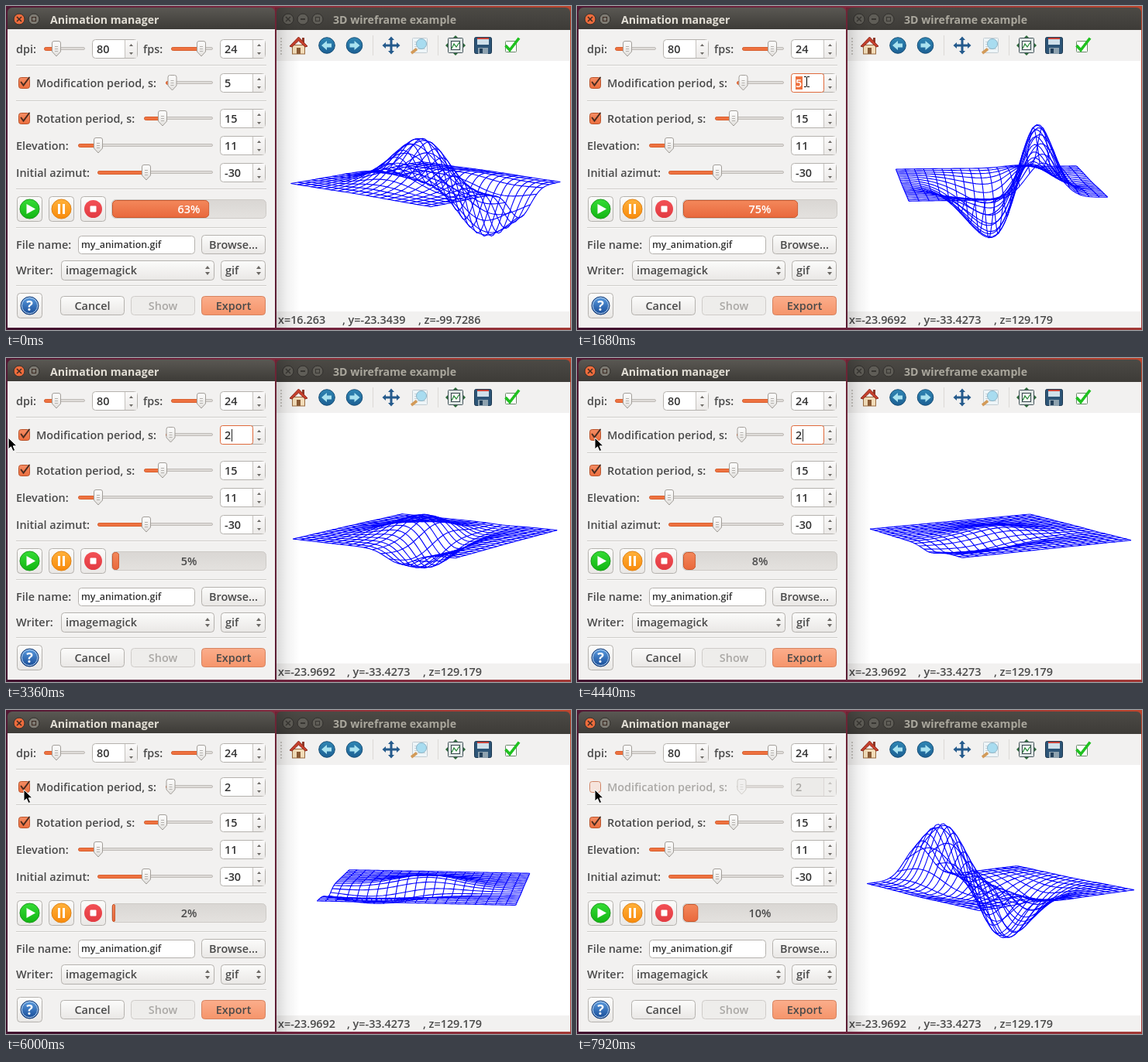
An HTML page with a canvas that plays this animation: 729x419 px, repeating every 8 s.

```html
<!DOCTYPE html>
<html lang="en">
<head>
<meta charset="utf-8">
<title>Animation manager</title>
<style>
html, body { margin: 0; width: 100%; height: 100%; overflow: hidden; background: #3d1430; }
canvas { display: block; }
</style>
</head>
<body>
<canvas id="stage" width="729" height="419"></canvas>
<script>
const c = document.getElementById('stage').getContext('2d');
const LOOP = 8000, STEP = 120, RAD = Math.PI / 180;
const FACE = '"Open Sans", "Noto Sans", sans-serif';
const INK = '#4a4a4a', PALE = '#aaa8a5', BG = '#f2f1f0', ORANGE = '#ee7240';

// ---------- helpers ----------
function gradient(x0, y0, x1, y1, ...stops) {
  const g = c.createLinearGradient(x0, y0, x1, y1);
  stops.forEach((s, i) => g.addColorStop(i / (stops.length - 1), s));
  return g;
}

const vgrad = (y, h, ...stops) => gradient(0, y, 0, y + h, ...stops);

function rect(x, y, w, h, fill) {
  c.fillStyle = fill;
  c.fillRect(x, y, w, h);
}

function box(x, y, w, h, r, fill, stroke) {
  c.beginPath();
  c.roundRect(x + .5, y + .5, w - 1, h - 1, r);
  if (fill) { c.fillStyle = fill; c.fill(); }
  if (stroke) { c.strokeStyle = stroke; c.lineWidth = 1; c.stroke(); }
}

function disc(x, y, r, fill, stroke) {
  c.beginPath();
  c.arc(x, y, r, 0, 7);
  c.fillStyle = fill;
  c.fill();
  if (stroke) { c.strokeStyle = stroke; c.lineWidth = 1; c.stroke(); }
}

function poly(pts, fill, stroke, width = 1, open) {
  c.beginPath();
  for (let i = 0; i < pts.length; i += 2) c.lineTo(pts[i], pts[i + 1]);
  if (!open) c.closePath();
  if (fill) { c.fillStyle = fill; c.fill(); }
  if (stroke) { c.strokeStyle = stroke; c.lineWidth = width; c.stroke(); }
}

function text(s, x, y, color = INK, align = 'left', size = 14.4, weight = 600) {
  c.font = `${weight} ${size}px ${FACE}`;
  c.textAlign = align;
  c.fillStyle = color;
  c.fillText(s, x, y);
}

// ---------- widgets ----------
function separator(y) {
  rect(13, y, 323, 1, '#cfcdca');
  rect(13, y + 1, 323, 1, '#fbfafa');
}

function button(x, y, w, h, label, color = INK, fill, stroke = '#b5b2ae') {
  box(x, y, w, h, 4, fill || vgrad(y, h, '#fcfcfb', '#e9e7e5'), stroke);
  if (label) text(label, x + w / 2, y + h / 2 + 5.5, color, 'center');
}

function slider(x0, x1, y, pos, off) {
  box(x0, y - 2, x1 - x0, 4, 2, '#dedbd8', off ? '#d3d0cd' : '#c0bcb8');
  if (!off) box(x0, y - 2, pos - x0, 5, 2, ORANGE, '#d9602f');
  const body = off ? '#f0efee' : vgrad(y - 10, 20, '#ffffff', '#e2e0dd');
  c.beginPath();
  c.moveTo(pos - 5.5, y - 7);
  c.quadraticCurveTo(pos - 5.5, y - 9.5, pos - 3, y - 9.5);
  c.lineTo(pos + 3, y - 9.5);
  c.quadraticCurveTo(pos + 5.5, y - 9.5, pos + 5.5, y - 7);
  c.lineTo(pos + 5.5, y + 4);
  c.lineTo(pos, y + 10);
  c.lineTo(pos - 5.5, y + 4);
  c.closePath();
  c.fillStyle = body;
  c.fill();
  c.strokeStyle = off ? '#cfccc8' : '#a29e99';
  c.lineWidth = 1;
  c.stroke();
  for (let i = -3; i < 4; i += 3) rect(pos - 2, y + i, 4, 1, off ? '#d8d6d3' : '#b4b1ad');
}

function spin(x, y, value, { off, focus, selected, caret } = {}) {
  const w = 59, split = x + 43;
  box(x, y, w, 25, 4, off ? '#ecebe9' : '#ffffff', off ? '#d0cdca' : '#b5b2ae');
  rect(split, y + 1, 15, 23, off ? '#eeedeb' : vgrad(y, 25, '#fbfafa', '#ebe9e7'));
  rect(split - 1, y + 1, 1, 23, off ? '#dad7d4' : '#c6c3bf');
  const mark = off ? '#c4c1be' : '#6b6864', ax = x + 50.5;
  poly([ax - 2.5, y + 9, ax, y + 6, ax + 2.5, y + 9], mark);
  poly([ax - 2.5, y + 17, ax, y + 20, ax + 2.5, y + 17], mark);
  if (focus) box(x, y, 43, 25, 3, '#ffffff', '#e06a3c');
  if (selected) rect(x + 6, y + 4, 9, 17, ORANGE);
  text(value, x + 6, y + 18, selected ? '#fff' : off ? PALE : '#333');
  if (caret) rect(x + 15, y + 5, 1, 16, '#222');
}

function checkbox(y, on) {
  box(16, y - 7, 15, 15, 3, on ? vgrad(y - 7, 15, '#f58e65', '#ec6d3d') : '#f6e4dc', on ? '#b9532b' : '#d08465');
  if (on) {
    c.lineCap = 'round';
    poly([19.5, y - .5, 22.5, y + 3.5, 30, y - 6.5], null, '#4a2c20', 2, true);
    c.lineCap = 'butt';
  }
}

function combo(x, w, label) {
  button(x, 329, w, 26);
  text(label, x + 6, 347);
  const ax = x + w - 9;
  poly([ax - 3, 340, ax, 336, ax + 3, 340], '#6b6864');
  poly([ax - 3, 344, ax, 348, ax + 3, 344], '#6b6864');
}

function progress(p) {
  const x = 136, y = 250, w = 200, h = 25, fill = Math.max(4, p * 198);
  const label = color => text(Math.round(p * 100) + '%', 236, 268, color, 'center');
  box(x, y, w, h, 5, vgrad(y, h, '#d9d6d3', '#e4e2df'), '#cdcac6');
  label(INK);
  c.save();
  c.beginPath();
  c.rect(x, y, fill + 1, h);
  c.clip();
  box(x + 1, y + 1, fill, h - 2, Math.min(5, fill / 2), vgrad(y, h, '#f48a5d', '#e8663a'), '#c9572c');
  label('#fff');
  c.restore();
}

// ---------- windows ----------
function titleBar(x, w, label, tx, active) {
  c.beginPath();
  c.roundRect(x, 2, w, 40, [6, 6, 0, 0]);
  c.fillStyle = active ? vgrad(2, 28, '#5a5853', '#3d3b37') : vgrad(2, 28, '#4c4a45', '#3e3c38');
  c.fill();
  const edge = '#302e2b', glyph = active ? '#3c2a22' : '#383632';
  const cx = x + 15, bg = active ? '#7d7a72' : '#5f5d57';
  const square = sx => {
    c.strokeStyle = glyph;
    c.strokeRect(sx - 2.5, 14.5, 5, 5);
  };
  disc(cx, 17, 7, active ? '#ee6c3c' : bg, edge);
  poly([cx - 3, 14, cx + 3, 20], null, glyph, 1.5, true);
  poly([cx + 3, 14, cx - 3, 20], null, glyph, 1.5, true);
  disc(cx + 19, 17, 7, bg, edge);
  if (active) {
    square(cx + 19);
  } else {
    rect(cx + 16, 16, 6, 2, glyph);
    disc(cx + 38, 17, 7, bg, edge);
    square(cx + 38);
  }
  text(label, tx, 23, active ? '#e3dfd6' : '#aaa79d', 'left', 14.1, 700);
}

function desktop() {
  rect(0, 0, 729, 419, gradient(0, 300, 729, 0, '#42122f', '#7b2740', '#bd452d'));
}

function leftWindow(s) {
  titleBar(2, 345, 'Animation manager', 57, true);
  rect(2, 30, 345, 386, BG);

  text('dpi:', 13, 61);
  slider(49, 102, 55, 65);
  spin(111, 43, '80');
  text('fps:', 177, 61);
  slider(213, 267, 55, 252);
  spin(276, 43, '24');
  [76, 122, 236, 286, 361].forEach(separator);

  checkbox(99, s.on);
  text('Modification period, s:', 39, 105, s.on ? INK : PALE);
  slider(206, 267, 99, s.period === 5 ? 214.5 : 212.5, !s.on);
  spin(276, 87, s.period, { off: !s.on, focus: s.focus, selected: s.selected, caret: s.focus && !s.selected });

  checkbox(145, true);
  text('Rotation period, s:', 39, 151);
  slider(178, 267, 145, 202);
  spin(276, 133, '15');
  text('Elevation:', 13, 186);
  slider(93, 267, 180, 119);
  spin(276, 168, '11');
  text('Initial azimut:', 13, 221);
  slider(118, 267, 215, 181);
  spin(276, 203, '-30');

  [14, 55, 96].forEach(x => button(x, 246, 33, 33));
  disc(30.5, 262.5, 12.5, vgrad(250, 25, '#35dc35', '#12b512'), '#1a9a1a');
  poly([26.5, 256, 38, 262.5, 26.5, 269], '#fff');
  disc(71.5, 262.5, 12.5, vgrad(250, 25, '#ffb13a', '#f88a0c'), '#e08212');
  rect(67, 256, 3, 13, '#fff');
  rect(73, 256, 3, 13, '#fff');
  disc(112.5, 262.5, 11.5, vgrad(251, 23, '#f25055', '#e23b42'));
  box(108, 258, 9, 9, 1, '#fff');
  progress(s.progress);

  text('File name:', 13, 314);
  box(93, 297, 151, 24, 4, '#fff', '#b5b2ae');
  text('my_animation.gif', 97, 313, '#333', 'left', 12.4);
  button(252, 296, 83, 25, 'Browse...');
  text('Writer:', 13, 347);
  combo(71, 198, 'imagemagick');
  combo(277, 58, 'gif');

  button(14, 371, 33, 33);
  disc(30.5, 387.5, 11.5, vgrad(376, 23, '#5c9de0', '#164a96'), '#153a74');
  c.beginPath();
  c.arc(30.5, 387.5, 10.2, 0, 7);
  c.strokeStyle = '#b9d3ee';
  c.stroke();
  text('?', 30.5, 394, '#fff', 'center', 18, 700);
  button(70, 375, 83, 25, 'Cancel');
  button(161, 375, 83, 25, 'Show', PALE, '#eeedeb', '#cfccc9');
  button(252, 375, 83, 25, 'Export', INK, vgrad(375, 25, '#fbae8c', '#f5946a'), '#d68360');
}

function arrowDisc(x, dir) {
  disc(x, 51, 10.3, vgrad(41, 21, '#2f86b4', '#1c5f93'), '#174f78');
  const p = (dx, dy) => [x + dir * dx, 51 + dy];
  poly([...p(-7, 0), ...p(0, -6), ...p(0, -2.5), ...p(6, -2.5), ...p(6, 2.5), ...p(0, 2.5), ...p(0, 6)], '#a9e2f0');
}

function toolbar() {
  for (let y = 41; y < 62; y += 4) rect(354, y, 2, 2, '#c6c3bf');
  rect(473, 38, 1, 26, '#dcd9d6');
  rect(557, 38, 1, 26, '#dcd9d6');

  rect(369, 50, 17, 12, '#f1dcb8');
  c.strokeStyle = '#9a6a40';
  c.strokeRect(369.5, 50.5, 16, 11.5);
  rect(382, 41, 3, 7, '#8d3a2a');
  poly([366, 52, 377.5, 40, 389, 52, 386, 53, 377.5, 45, 369, 53], '#c8402c', '#8e2a1e');
  rect(375, 54, 5, 8, '#8a5a34');

  arrowDisc(414, 1);
  arrowDisc(449.5, -1);

  for (let k = 0; k < 4; k++) {
    c.save();
    c.translate(497, 51);
    c.rotate(k * Math.PI / 2);
    poly([-1.5, 0, -1.5, -7, -4, -7, 0, -11.5, 4, -7, 1.5, -7, 1.5, 0], '#245a8c');
    c.restore();
  }

  box(524, 41, 20, 20, 1, '#eef5f8', '#c3ccd2');
  for (let y = 46; y < 58; y += 3) rect(527, y, 14, 1, '#c9d2d8');
  poly([523, 61, 530, 55.5], null, '#d39a58', 3.5, true);
  disc(536, 49, 6.5, '#a8dcf0', '#8db4c6');

  box(570, 41, 20, 20, 1, '#dfe6e4', '#44545a');
  rect(574, 45, 12, 12, '#fff');
  c.strokeStyle = '#33444a';
  c.strokeRect(574.5, 45.5, 11, 11);
  poly([575, 55, 578, 49, 581, 53, 585, 47], null, '#2b8b3c', 1.3, true);
  [[580, 39], [592, 51], [580, 63], [568, 51]].forEach(([x, y], k) => {
    c.save();
    c.translate(x, y);
    c.rotate(k * Math.PI / 2);
    poly([-3, 2, 0, -1, 3, 2], '#2d6a3a');
    c.restore();
  });

  box(604, 40, 23, 22, 2, '#2d5577', '#1b364e');
  rect(608, 41, 15, 9, '#cfe0ea');
  rect(608, 41, 15, 2, '#c9443a');
  rect(609, 54, 13, 8, '#8fa3b0');
  rect(611, 55, 4, 6, '#23405a');

  box(644, 45, 15, 15, 1, '#fff', '#6a8a6a');
  poly([644.5, 51, 650, 57, 662, 41.5], null, '#1fc11f', 3.6, true);
}

// ---------- surface ----------
const steps = (n, by) => [...Array(n).keys()].map(i => i * by).concat(119).map(i => i * .05 - 3);
const marks = steps(20, 6), fine = steps(60, 2);

function height(x, y) {
  const hill = Math.exp(-(x * x + y * y) / 2);
  const ridge = Math.exp(-(((x - 1) / 1.5) ** 2 + ((y - 1) / .5) ** 2) / 2);
  return (ridge / .75 - hill) / (2 * Math.PI);
}

function surface(azim, amp) {
  const size = 248, tilt = 9.6 * RAD, ce = Math.cos(tilt), se = Math.sin(tilt);
  const ca = Math.cos(azim), sa = Math.sin(azim);
  const put = (x, y) => {
    const side = (y * ca - x * sa) / 6, near = (x * ca + y * sa) / 6;
    const z = height(x, y) * amp / size;
    const w = 1 - (near * ce + z * se) / 10;
    c.lineTo(543.3 + size * side / w, 228.5 - size * (z * ce - near * se) / w);
  };
  c.save();
  c.beginPath();
  c.rect(349, 71, 378, 324);
  c.clip();
  c.strokeStyle = '#0000ff';
  c.lineWidth = 1.1;
  c.lineJoin = 'round';
  for (const m of marks) {
    c.beginPath();
    fine.forEach(f => put(m, f));
    c.stroke();
    c.beginPath();
    fine.forEach(f => put(f, m));
    c.stroke();
  }
  c.restore();
}

function rightWindow(s) {
  titleBar(349, 379, '3D wireframe example', 422, false);
  rect(349, 31, 379, 385, BG);
  toolbar();
  rect(349, 71, 378, 324, '#fff');
  surface(s.azim, s.amp);
  const read = s.entered
    ? [['x=-23.9692', 351], [', y=-33.4273', 440], [', z=129.179', 538]]
    : [['x=16.263', 351], [', y=-23.3439', 434], [', z=-99.7286', 532]];
  read.forEach(([label, x]) => text(label, x, 411));
  // shadow cast by the front window
  rect(347, 2, 32, 414, gradient(347, 0, 379, 0, 'rgba(0,0,0,.16)', 'rgba(0,0,0,.05)', 'rgba(0,0,0,0)'));
}

// ---------- pointer ----------
const PATH = [
  [.24, 440, 0], [.36, 372, 70], [.6, 90, 104], [.84, 296, 98], [1.92, 296, 98],
  [2.52, 14, 102], [2.76, 3, 103], [3.84, 3, 103], [4.2, 23, 103], [8, 23, 103]
];

function pointer(t) {
  const i = PATH.findIndex(k => k[0] > t + 1e-6);
  if (i < 1) return;
  const [a, b] = [PATH[i - 1], PATH[i]];
  const f = (t - a[0]) / (b[0] - a[0]);
  const x = a[1] + (b[1] - a[1]) * f, y = a[2] + (b[2] - a[2]) * f;
  if (x > 276 && x < 318 && y > 87) {
    const beam = [[x - 3, y - 7, 3, 1], [x + 1, y - 7, 3, 1], [x, y - 6, 1, 12], [x - 3, y + 6, 3, 1], [x + 1, y + 6, 3, 1]];
    beam.forEach(([l, u, w, h]) => rect(l - 1, u - 1, w + 2, h + 2, '#fff'));
    beam.forEach(r => rect(...r, '#000'));
    return;
  }
  c.save();
  c.translate(x, y);
  poly([0, 0, 0, 15, 3.5, 11.8, 6, 17.5, 8.6, 16.4, 6.2, 10.8, 11, 10.8], '#000', '#fff', 1);
  c.restore();
}

// ---------- timeline ----------
const SWAP = 1.98, OFF = 5.03, ON = 5.39, END = 6.44;

function state(t) {
  const wave = deg => 520 * Math.sin(deg * RAD);
  const s = {
    azim: (24 * t - 47) * RAD,
    entered: t > .35,
    period: t < SWAP ? 5 : 2,
    selected: t > 1.3 && t < SWAP,
    focus: t > 1.3 && t < 4.75,
    on: t < OFF || (t >= ON && t < END)
  };
  if (t < SWAP) {
    s.progress = .633 + t / 14.5;
    s.amp = wave(72.5 * t - 50.5);
  } else if (t < OFF) {
    s.progress = (t - SWAP) / 30;
    s.amp = wave(191 * (t - 3.36) - 19);
  } else if (s.on) {
    s.progress = (t - ON) / 30;
    s.amp = wave(188 * (t - 6) - 10);
  } else {
    s.progress = (t - (t < ON ? OFF : END)) / 15;
    s.amp = 465;
  }
  return s;
}

let last = -1;
function tick() {
  const frame = Math.floor(performance.now() % LOOP / STEP);
  if (frame !== last) {
    last = frame;
    const t = frame * STEP / 1000, s = state(t);
    desktop();
    rightWindow(s);
    leftWindow(s);
    pointer(t);
  }
  requestAnimationFrame(tick);
}
tick();
</script>
</body>
</html>
```
